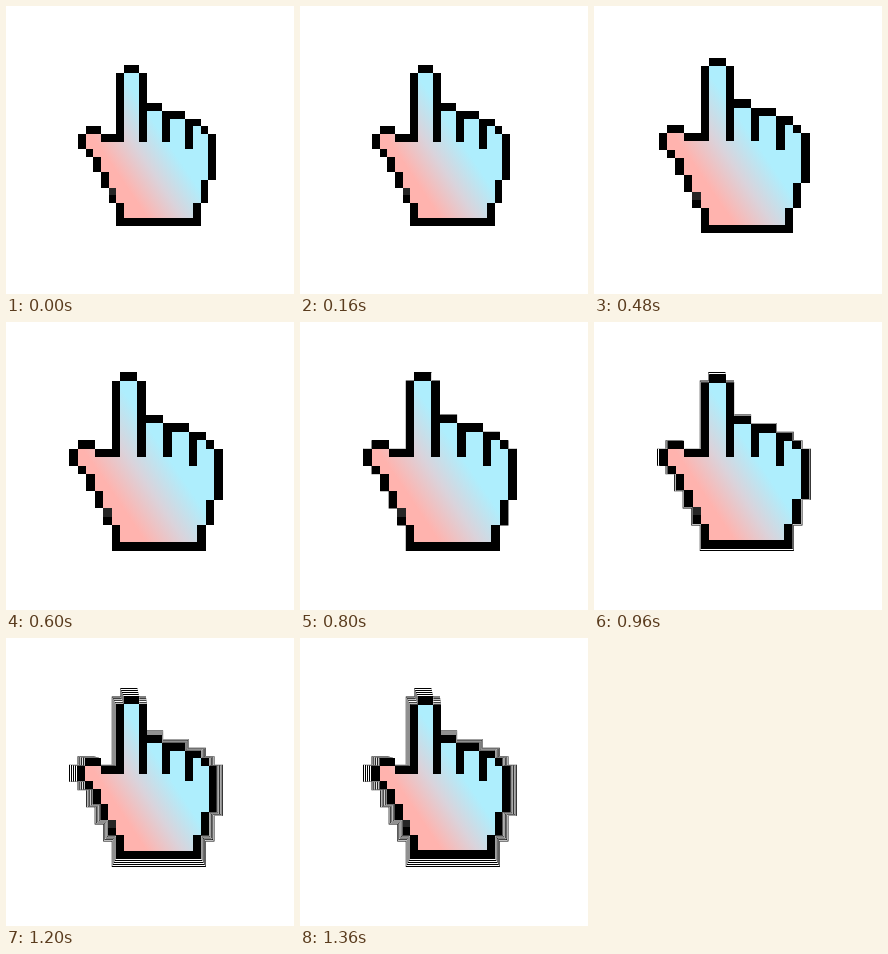
An HTML page with a canvas that plays this animation: 288x288 px, repeating every 1.4 s.

```html
<!DOCTYPE html>
<html lang="en">
<head>
<meta charset="utf-8">
<title>Pulsing pointer</title>
<style>
  html, body { margin: 0; width: 100%; height: 100%; overflow: hidden; background: #fff; }
  canvas { display: block; width: 288px; height: 288px; }
</style>
</head>
<body>
<canvas id="stage" width="288" height="288"></canvas>
<script>
const ctx = document.getElementById('stage').getContext('2d');
const LOOP = 1400, HALF = LOOP / 2, STEP = 40, REST = 70;
const ECHO = 2 / 9; // growth between two echo lines

const lerp = (a, b, p) => a + (b - a) * p;
const easeInOut = x => x < 0.5 ? 4 * x ** 3 : 1 - 4 * (1 - x) ** 3;

// Rests small, swells, then shrinks along the same curve
function growth(t) {
  const x = (HALF - Math.abs(HALF - t) - REST) / (HALF - REST);
  return easeInOut(Math.max(0, x));
}

// Maps the 18 x 21 cell grid of the hand to the stage
function gridAt(p, snap) {
  const left = lerp(72, 63, p), right = lerp(210, 217, p);
  const top = lerp(59, 50, p), bottom = lerp(220, 229, p);
  const fit = snap ? Math.round : v => v;
  return {
    x: col => fit(lerp(left, right, col / 18)),
    y: row => fit(lerp(top, bottom, row / 21))
  };
}

function bar(path, grid, x, y, w, h) {
  const x0 = grid.x(x), y0 = grid.y(y);
  path.rect(x0, y0, grid.x(x + w) - x0, grid.y(y + h) - y0);
}

function addSkin(path, grid, dx = 0, dy = 0) {
  const add = (x, y, w, h) => bar(path, grid, x + dx, y + dy, w, h);
  for (let i = 0; i < 4; i++) {
    const tip = i ? 5 + i : 1;
    add(6 + 3 * i, tip, i < 3 ? 2 : 1, 10 - tip);
  }
  for (let i = 0; i < 5; i++) {
    add(2 + i, 10 + 2 * i, (i < 4 ? 14 : 13) - i, 2);
  }
  add(1, 9, 2, 2);  // thumb
  add(16, 9, 1, 6); // edge of the palm
}

// The outline covers every cell beside a skin cell
function silhouette(grid) {
  const path = new Path2D();
  for (const d of [-1, 1]) {
    addSkin(path, grid, d, 0);
    addSkin(path, grid, 0, d);
  }
  bar(path, grid, 5, 20, 11, 1);
  return path;
}

function fill(path, style) {
  ctx.fillStyle = style;
  ctx.fill(path);
}

function cell(grid, x, y, style) {
  const path = new Path2D();
  bar(path, grid, x, y, 1, 1);
  fill(path, style);
}

function drawHand(p) {
  const grid = gridAt(p, true);
  const skin = new Path2D();
  addSkin(skin, grid);

  const tint = ctx.createLinearGradient(grid.x(6.2), grid.y(15.8), grid.x(12.6), grid.y(11.5));
  tint.addColorStop(0, '#ffb3ae');
  tint.addColorStop(0.5, '#dad3db');
  tint.addColorStop(1, '#aeeefd');

  fill(silhouette(grid), '#000');
  fill(skin, tint);
  cell(grid, 14, 10, '#000');
  cell(grid, 4, 16, '#262626');
}

// Thin outlines left behind while the hand shrinks
function drawEchoes(p) {
  for (let q = 1; q > p; q -= ECHO) {
    fill(silhouette(gridAt(q)), '#000');
    fill(silhouette(gridAt(q - ECHO / 2)), '#fff');
  }
}

let shown = -1;
function render(now) {
  const step = Math.floor(now % LOOP / STEP);
  if (step !== shown) {
    shown = step;
    const t = step * STEP, p = growth(t);
    ctx.fillStyle = '#fff';
    ctx.fillRect(0, 0, 288, 288);
    if (t > HALF) drawEchoes(p);
    drawHand(p);
  }
  requestAnimationFrame(render);
}
render(performance.now());
</script>
</body>
</html>
```
